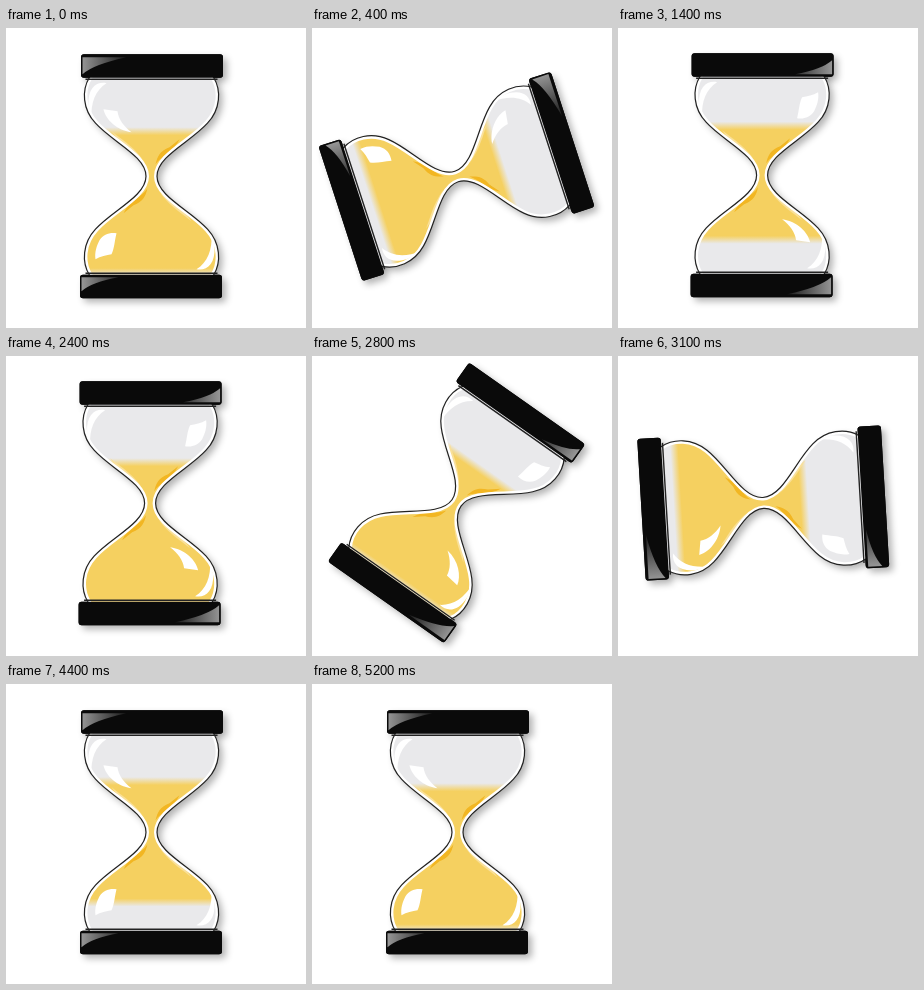
These frames come from a looping animation (300x300 px, 5300 ms). An HTML page with a canvas:

```html
<!DOCTYPE html>
<html>
<head>
<meta charset="utf-8">
<title>Hourglass</title>
<style>
html, body { margin: 0; width: 100%; height: 100%; overflow: hidden; background: #fff; }
canvas { display: block; }
</style>
</head>
<body>
<canvas id="stage" width="300" height="300"></canvas>
<script>
const ctx = document.getElementById('stage').getContext('2d');
const LOOP = 5300, STEP = 100;
const NEAR = 43, MID = 55, FULL = 98; // sand levels, measured from the neck

// Shapes are relative to the centre of the neck.
const glass = new Path2D(`M-60-108L-62-99C-70-86-69-67-56-53C-39-34-5.5-20-5.5 0C-5.5 20-39 34-56 53C-69 67-70 86-62 99
  L-60 108H60L62 99C70 86 69 67 56 53C39 34 5.5 20 5.5 0C5.5-20 39-34 56-53C69-67 70-86 62-99L60-108Z`);
const caps = new Path2D();
caps.roundRect(-70.5, -122, 142, 23.5, 3);
caps.roundRect(-71.5, 98.5, 142, 23.5, 3);
const lips = new Path2D('M-66-97H66M-66 97H66');
const facets = new Path2D('M-25-119Q-58-112-69-102V-119ZM-33 101Q-60 106-70 115V101Z');
const shine = new Path2D(`M-20-44C-35-46-46-57-48-67L-34-65C-33-57-28-50-20-44Z
  M-52 64C-48 58-42 56-35 57C-37 65-37 72-40 78C-45 79-51 80-56 83C-57 76-55 70-52 64Z`);

// Details of one bulb, drawn above the neck.
const shade = new Path2D('M4-12C6-20 8-25 18-29L28-37C22-24 10-21 4-12Z');
const glint = new Path2D('M-9-17C-20-25-32-33-40-45C-32-38-20-32-9-17Z');
const crescent = new Path2D('M-60-57C-61-74-56-86-45-93C-55-95-64-88-63-71Z');

const facetFill = ctx.createLinearGradient(-25, 0, -71, 0);
facetFill.addColorStop(0, '#1a1a1a');
facetFill.addColorStop(1, '#999');

const clamp = x => Math.min(1, Math.max(0, x));

function paint(path, color) {
  ctx.fillStyle = color;
  ctx.fill(path);
}

function outline(path, color, width) {
  ctx.strokeStyle = color;
  ctx.lineWidth = width;
  ctx.stroke(path);
}

function setShadow(on) {
  ctx.shadowColor = on ? 'rgba(0,0,0,.3)' : 'transparent';
  ctx.shadowBlur = 7;
  ctx.shadowOffsetX = ctx.shadowOffsetY = 4;
}

// Fills the upper bulb from the neck to the given level with a soft edge.
function sand(level) {
  const edge = ctx.createLinearGradient(0, 4 - level, 0, -4 - level);
  edge.addColorStop(0, '#f5d060');
  edge.addColorStop(1, 'rgba(245,208,96,0)');
  ctx.fillStyle = edge;
  ctx.fillRect(-72, -level - 5, 144, level + 5.5);
  paint(shade, '#f2b622');
  paint(glint, '#f9e09a');
  paint(crescent, '#fff');
}

function draw(t) {
  const second = t >= 2500;
  const [start, turn, end] = second ? [2595, 1050, 5200] : [0, 1000, 2400];
  const ramp = (from, to) => clamp((t - from) / (to - from));
  const spin = ramp(start, start + turn);
  const pour = ramp(start + turn, end);
  const rise = ramp(start + turn * .85, end);
  const drained = FULL - (FULL - MID) * spin ** 1.5 - (MID - NEAR) * pour;
  const filled = NEAR + (FULL - NEAR) * rise;
  const [top, bottom] = second ? [drained, filled] : [filled, drained];

  ctx.fillStyle = '#fff';
  ctx.fillRect(0, 0, 300, 300);
  ctx.save();
  ctx.translate(144.8, 147.7);
  ctx.rotate(Math.PI * (spin + second));
  ctx.translate(.7, .5);

  setShadow(true);
  paint(glass, '#e9e9eb');
  paint(caps, '#0a0a0a');
  setShadow(false);

  ctx.save();
  ctx.clip(glass);
  paint(glass, '#e9e9eb');
  // The sand sits slightly off the middle of the glass.
  for (const level of [top + 2, bottom - 2]) {
    sand(level);
    ctx.rotate(Math.PI);
  }
  outline(glass, '#fff', 6);
  paint(shine, '#fff');
  ctx.restore();

  outline(glass, '#222', 1.2);
  outline(lips, '#222', 1.4);
  paint(caps, '#0a0a0a');
  paint(facets, facetFill);
  ctx.restore();
}

function tick() {
  const t = performance.now() % LOOP;
  draw(Math.floor(t / STEP) * STEP);
  requestAnimationFrame(tick);
}
tick();
</script>
</body>
</html>
```
